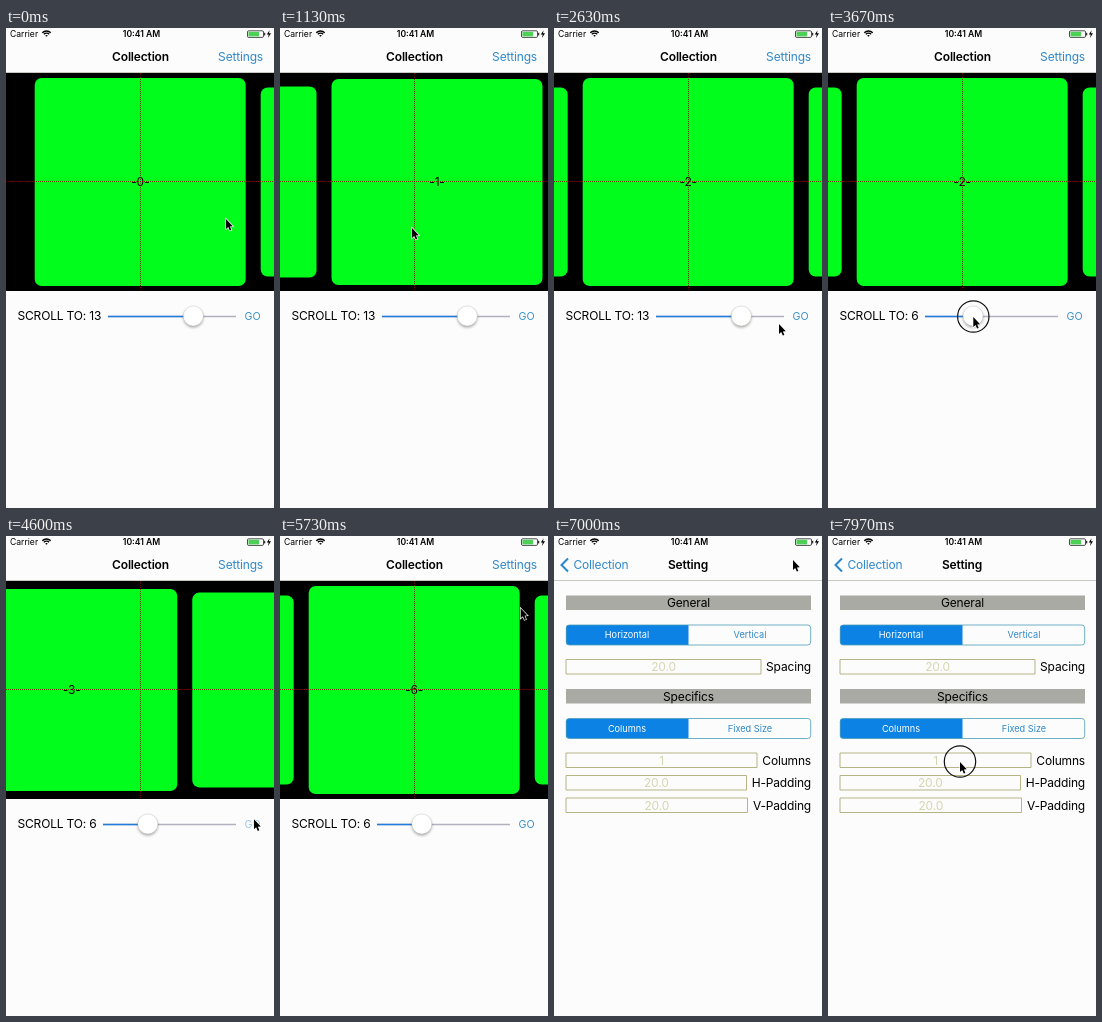
An HTML page with a canvas that plays this animation: 268x480 px, repeating every 8 s.

```html
<!DOCTYPE html>
<html lang="en">
<head>
<meta charset="utf-8">
<title>Collection</title>
<style>
  html, body { margin: 0; width: 100%; height: 100%; overflow: hidden; background: #fcfcfd; }
  canvas { display: block; width: 100vw; height: 100vh; }
</style>
</head>
<body>
<canvas></canvas>
<script>
const LOOP = 8000, W = 268, H = 480, MID = W / 2;
const BLUE = '#0c82e4', LINK = '#2f88c8', PAGE = '#fcfcfd', GREEN = '#00fd1c';
const PITCH = 226, CARD_W = 211, CARD_COUNT = 20;
const DRAG_TIME = 260, GLIDE_SHARE = .87;
const canvas = document.querySelector('canvas');
const ctx = canvas.getContext('2d');

const smooth = u => (1 - Math.cos(Math.PI * u)) / 2;
const decel = u => 1 - (1 - u) ** 3;
const mix = (a, b, u) => a + (b - a) * u;
const ramp = (t, start, duration) => Math.min(1, Math.max(0, (t - start) / duration));

// Where the pointer arrives; it rests for the first part of each gap and then glides.
const STOPS = [
  { at: 580, x: 220, y: 191 },
  { at: 880, x: 132, y: 200, act: 'drag' },
  { at: 1150, x: 132, y: 200 },
  { at: 1400, x: 204, y: 199 },
  { at: 1699, x: 120, y: 197, act: 'drag' },
  { at: 2630, x: 225, y: 296 },
  { at: 2950, x: 187, y: 289 },
  { at: 3800, x: 142, y: 289, act: 'drag' },
  { at: 4300, x: 248, y: 284, act: 'tap' },
  { at: 6200, x: 239, y: 24, act: 'tap' },
  { at: 7400, x: 239, y: 24 },
  { at: 7880, x: 132, y: 226, act: 'tap' },
];

function pointerAt(t) {
  const next = STOPS.findIndex(s => s.at > t);
  const to = STOPS.at(next), from = STOPS[Math.max(0, next - 1)] || to;
  if (next < 0) return { ...to, pressed: isTapping(to, t) };
  const glide = (to.at - from.at) * GLIDE_SHARE;
  const u = glide ? smooth(ramp(t, to.at - glide, glide)) : 0;
  return {
    x: mix(from.x, to.x, u),
    y: mix(from.y, to.y, u),
    pressed: isTapping(from, t) || (to.act === 'drag' && u > 0),
  };
}

function isTapping(stop, t) {
  return stop.act === 'tap' && t > stop.at + 20 && t < stop.at + 170;
}

// A swipe follows the pointer, then slows down onto the next page.
function swipe(t, start) {
  const dragged = 84;
  return dragged * smooth(ramp(t, start, DRAG_TIME)) +
    (PITCH - dragged) * decel(ramp(t, start + DRAG_TIME, 550));
}

const scrollAt = t => swipe(t, 620) + swipe(t, 1439) + 4 * PITCH * smooth(ramp(t, 4485, 300));
const sliderAt = t => mix(13.25, 5.85, smooth(ramp(t, 3060, 740)));
const pushAt = t => decel(ramp(t, 6382, 502));
const tapAlpha = (t, start) => 1 - .75 * (ramp(t, start, 20) - ramp(t, start + 200, 300));

function text(str, x, y, { size = 12, color = '#000', align = 'center', weight = 400, alpha = 1 } = {}) {
  ctx.save();
  ctx.globalAlpha *= Math.max(0, alpha);
  ctx.font = `${weight} ${size}px Inter, Roboto, sans-serif`;
  ctx.letterSpacing = size > 10 ? '-0.17px' : '0px';
  ctx.textAlign = align;
  ctx.fillStyle = color;
  ctx.fillText(str, x, y + size * .36);
  ctx.restore();
}

function rect(x, y, w, h, color) {
  ctx.fillStyle = color;
  ctx.fillRect(x, y, w, h);
}

function roundRect(x, y, w, h, r) {
  ctx.beginPath();
  ctx.roundRect(x, y, w, h, r);
}

function polygon(points) {
  ctx.beginPath();
  points.forEach(([x, y]) => ctx.lineTo(x, y));
  ctx.closePath();
}

function line(points, color, width = 1) {
  ctx.beginPath();
  points.forEach(([x, y]) => ctx.lineTo(x, y));
  stroke(color, width);
}

function stroke(color, width) {
  ctx.strokeStyle = color;
  ctx.lineWidth = width;
  ctx.stroke();
}

function fill(color) {
  ctx.fillStyle = color;
  ctx.fill();
}

function drawCards(scroll) {
  rect(0, 45, W, 218, '#000');
  for (let i = 0; i < CARD_COUNT; i++) {
    const offset = i * PITCH - scroll, x = MID + .2 + offset;
    if (Math.abs(offset) > W) continue;
    const h = 208 - 19 * Math.min(1, Math.abs(offset) / PITCH);
    roundRect(x - CARD_W / 2, 154 - h / 2, CARD_W, h, 7);
    fill(GREEN);
    text(`-${i}-`, x, 154);
  }
  ctx.save();
  ctx.setLineDash([1, 1]);
  line([[0, 153.5], [W, 153.5]], 'rgba(140,0,0,.75)');
  line([[134.5, 45], [134.5, 263]], 'rgba(140,0,0,.75)');
  ctx.restore();
}

function drawSlider(value, goAlpha) {
  const n = Math.round(value), y = 288, right = 230, radius = 10;
  const left = n > 9 ? 102 : 97;
  const thumb = mix(left + radius, right - radius, value / (CARD_COUNT - 1));
  text(`SCROLL TO: ${n}`, 11.5, y, { align: 'left' });
  line([[left, y + .6], [right, y + .6]], '#b4b0c0', 1.5);
  line([[left, y + .6], [thumb, y + .6]], '#217cdc', 1.5);
  ctx.save();
  ctx.shadowColor = 'rgba(0,0,0,.35)';
  ctx.shadowBlur = 3 * canvas.width / W;
  ctx.shadowOffsetY = 1.5 * canvas.width / W;
  ctx.beginPath();
  ctx.arc(thumb, y, radius, 0, 7);
  fill('#fff');
  ctx.restore();
  stroke('#c4c4b8', .4);
  text('GO', 246.5, y, { size: 10.7, color: '#3d93c4', alpha: goAlpha });
}

function drawCollection(t, push) {
  ctx.save();
  ctx.translate(-80 * push, 0);
  rect(0, 44, W + 80, H, PAGE);
  rect(0, 263, W + 80, H, `rgba(225,220,130,${.5 * push})`);
  drawCards(scrollAt(t));
  drawSlider(sliderAt(t), tapAlpha(t, 4310));
  ctx.restore();
}

function header(label, y) {
  rect(12, y, 245, 14.5, '#aaaaa5');
  text(label, 134.5, y + 7.2);
}

function segments(first, second, y) {
  roundRect(12, y, 122.5, 20, [3, 0, 0, 3]);
  fill(BLUE);
  roundRect(12.3, y, 244.4, 20, 3);
  stroke('#4b9db5', .8);
  text(first, 73, y + 10, { size: 9.2, color: '#fff' });
  text(second, 196, y + 10, { size: 9.2, color: LINK });
}

function field(value, label, y, right) {
  roundRect(12, y, right - 12, 14.5, 0);
  stroke('#a3a368', .8);
  text(value, (12 + right) / 2, y + 7.5, { color: '#d6d6b0' });
  text(label, 257, y + 7.5, { align: 'right' });
}

function drawSettings(push) {
  ctx.save();
  ctx.translate(W * (1 - push), 0);
  rect(0, 44, W, H, PAGE);
  header('General', 59.5);
  segments('Horizontal', 'Vertical', 89);
  field('20.0', 'Spacing', 123.5, 207);
  header('Specifics', 153);
  segments('Columns', 'Fixed Size', 182.5);
  field('1', 'Columns', 217, 203);
  field('20.0', 'H-Padding', 239.5, 192.5);
  field('20.0', 'V-Padding', 262, 193.5);
  ctx.restore();
}

function drawStatusBar() {
  text('Carrier', 4, 6, { size: 8.6, align: 'left' });
  text('10:41 AM', 135.5, 6, { size: 8.6, weight: 600 });
  for (const r of [1.2, 3.8, 6]) {
    ctx.beginPath();
    ctx.arc(40.5, 9, r, -Math.PI * .75, -Math.PI * .25);
    stroke('#000', 1.3);
  }
  roundRect(241.5, 2.8, 16, 6.6, 1.2);
  stroke('#000', .7);
  rect(242.5, 3.8, 10.5, 4.6, '#4cd055');
  rect(258.2, 4.8, 1, 2.6, '#000');
  polygon([[263.6, 2.2], [260.8, 6.6], [262.7, 6.6], [262, 10], [265, 5.3], [263, 5.3]]);
  fill('#000');
}

function drawNavBar(t, push) {
  rect(0, 0, W, 44, PAGE);
  rect(0, 44, W, .7, '#b4b4a8');
  drawStatusBar();
  const backX = 134.5 - 87.5 * push;
  text('Collection', backX, 29, { weight: 600, alpha: 1 - 2 * push });
  text('Collection', backX, 29, { color: LINK, alpha: push });
  text('Setting', 134 + 175 * (1 - push), 29, { weight: 600, alpha: push });
  text('Settings', 257, 29, { align: 'right', color: LINK, alpha: tapAlpha(t, 6220) * (1 - push) });
  ctx.save();
  ctx.globalAlpha = push ** 4;
  line([[14, 22.5], [7.5, 29], [14, 35.5]], '#2788d0', 2);
  ctx.restore();
}

function drawPointer({ x, y, pressed }) {
  ctx.save();
  ctx.translate(x, y);
  if (pressed) {
    ctx.beginPath();
    ctx.arc(0, -.5, 15.7, 0, 7);
    stroke('#111', 1.2);
  }
  polygon([[0, 0], [0, 10], [2.2, 8], [3.8, 11.6], [5.4, 10.9], [3.9, 7.4], [6.8, 7.2]]);
  stroke('#fff', 1.3);
  fill('#000');
  ctx.restore();
}

function resize() {
  const ratio = window.devicePixelRatio || 1;
  canvas.width = innerWidth * ratio;
  canvas.height = innerHeight * ratio;
}

function frame(now) {
  const t = now % LOOP, push = pushAt(t);
  ctx.setTransform(canvas.width / W, 0, 0, canvas.height / H, 0, 0);
  drawCollection(t, push);
  if (push > 0) drawSettings(push);
  drawNavBar(t, push);
  drawPointer(pointerAt(t));
  requestAnimationFrame(frame);
}

addEventListener('resize', resize);
resize();
requestAnimationFrame(frame);
</script>
</body>
</html>
```
